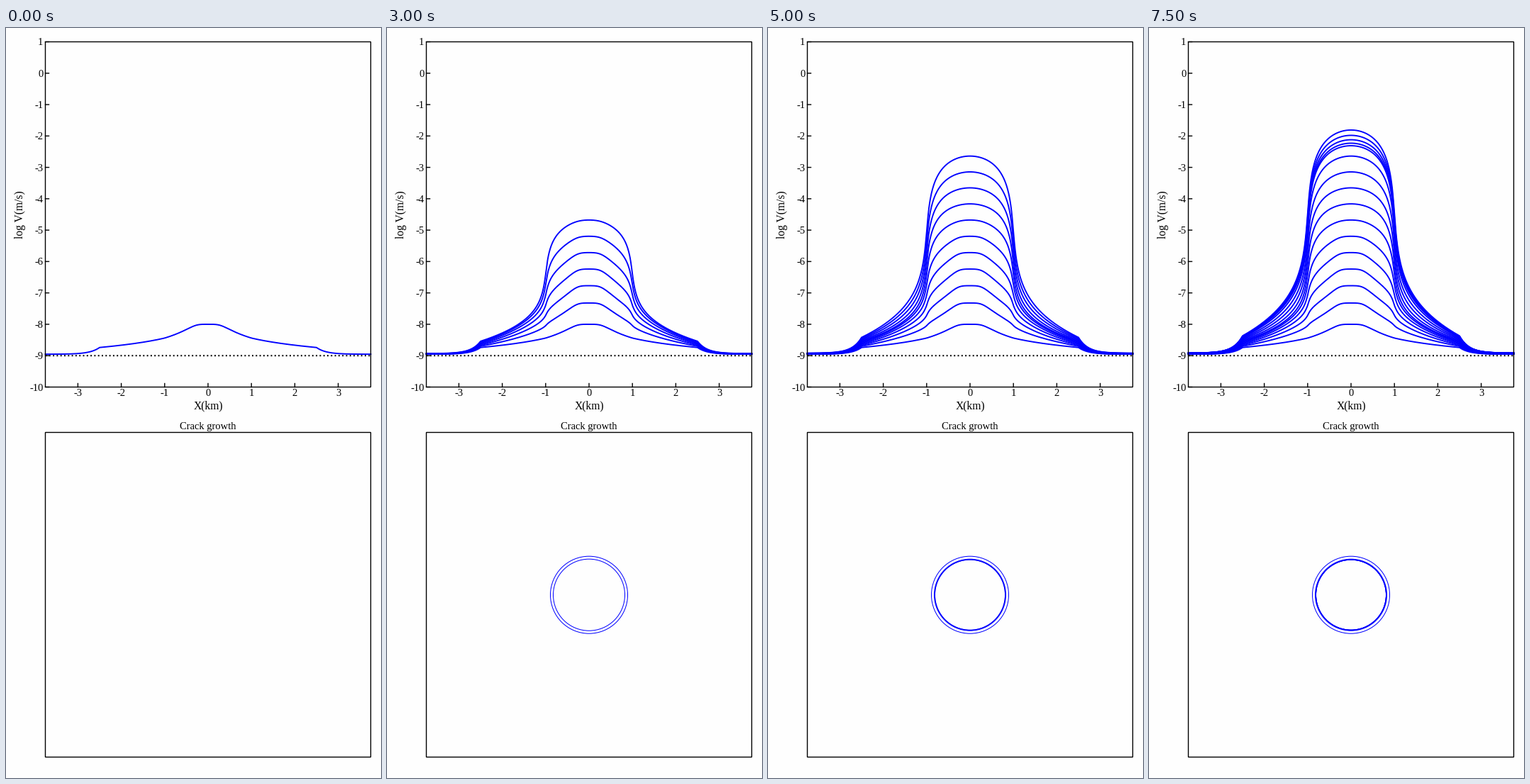
A matplotlib script that plays this animation: 529x1058 px, repeating every 8000 ms.

```python
import numpy as np
import matplotlib.pyplot as plt
from matplotlib.animation import FuncAnimation
from matplotlib.patches import Circle, Rectangle

W, H, DPI = 529, 1058, 64
FRAMES, STEP = 16, 500
LEFT, RIGHT, TOP, BOTTOM = 55.5, 514.5, 19.5, 506.5
MID, KM, DECADE = 285.0, 61.2, (BOTTOM - TOP) / 11
BLUE = "#0000ff"

plt.rcParams["font.family"] = "Liberation Serif"


def px(v):
    """Pixels to points."""
    return v * 72 / DPI


def row(v):
    return TOP + (1 - v) * DECADE


fig = plt.figure(figsize=(W / DPI, H / DPI), dpi=DPI, facecolor="#fefefe")
ax = fig.add_axes([0, 0, 1, 1])
ax.set_xlim(0, W)
ax.set_ylim(H, 0)
ax.axis("off")


def text(x, y, s, size=14.6, ha="center", rotation=0):
    ax.text(x, y, s, fontsize=px(size), ha=ha, va="baseline",
            rotation=rotation, rotation_mode="anchor")


def box(top, bottom):
    ax.add_patch(Rectangle((LEFT, top), RIGHT - LEFT, bottom - top, fill=False,
                           ec="black", lw=px(1.4), zorder=5, snap=False))


def tick(xs, ys):
    ax.plot(xs, ys, color="black", lw=px(1.4), zorder=5, snap=False)


box(TOP, BOTTOM)
box(570.5, 1028.5)

for v in range(-10, 2):
    tick([LEFT, LEFT + 5], [row(v)] * 2)
    text(52.5, row(v) + 5, str(v), ha="right")
for k in range(-3, 4):
    tick([MID + k * KM] * 2, [BOTTOM, BOTTOM - 5])
    text(MID + k * KM, 519.3, str(k))
text(MID, 537.3, "X(km)", 15.6)
text(24.3, 263.5, "log V(m/s)", 15.6, rotation=90)
text(MID, 566, "Crack growth")

ax.plot([LEFT, RIGHT], [row(-9)] * 2, color="black", lw=px(2),
        ls=(0, (1, 1.65)), dash_capstyle="butt", zorder=2, snap=False)

EDGE, RIM = 1.0, 2.5     # crack edge and end of the weak zone, km


def crest(n):
    """Peak log velocity: a steady climb, then a slow restart."""
    climb = -7.83 + 0.535 * n - 0.0016 * n * n - 0.17 * np.exp(-1.9 * n)
    late = n - 11
    return min(climb, -2.31 + 0.065 * late + 0.015 * late * late)


def soft(u):
    """Early bell with a logarithmic tail."""
    return np.log1p((u / 0.36) ** 4)


def sharp(u):
    """Crack-like dome with a steep edge."""
    return -np.arcsinh((1 - u * u) / 0.09)


def fall(shape, u, a, b):
    """Share of the drop between distances a and b, from 0 to 1."""
    return (shape(np.clip(u, a, b)) - shape(a)) / (shape(b) - shape(a))


def log_speed(n, u):
    peak = crest(n)
    rise = peak + 9
    mix = np.clip((rise - 1) / 3.5, 0, 1)
    dome = 0.45 * rise - 0.011 * rise ** 2
    rim = -8.8 + 0.06 * rise
    base = -8.96 + 0.006 * rise

    def blend(a, b):
        return (1 - mix) * fall(soft, u, a, b) + mix * fall(sharp, u, a, b)

    inner = peak - dome * blend(0, EDGE) - (peak - dome - rim) * blend(EDGE, RIM)
    outer = base + (rim - base) * np.exp(-(u - RIM) / 0.22)
    return np.where(u < RIM, inner, outer)


xs = np.linspace(LEFT, RIGHT, 919)
lines = [ax.plot(xs, row(log_speed(n, np.abs(xs - MID) / KM)), color=BLUE,
                 lw=px(1.9), zorder=3)[0] for n in range(FRAMES)]

# A new crack outline every second step, settling on a final radius
rings = []
for k in range(6):
    ring = Circle((MID, 799.7), 49.5 + 5 * np.exp(-1.6 * k), fill=False,
                  ec=BLUE, lw=px(1))
    rings.append((4 + 2 * k, ax.add_patch(ring)))


def update(n):
    for i, line in enumerate(lines):
        line.set_visible(i <= n)
    for start, ring in rings:
        ring.set_visible(start <= n)
    return lines + [ring for _, ring in rings]


anim = FuncAnimation(fig, update, frames=FRAMES, interval=STEP,
                     init_func=lambda: update(0), repeat=True, repeat_delay=0)
plt.show()
```
